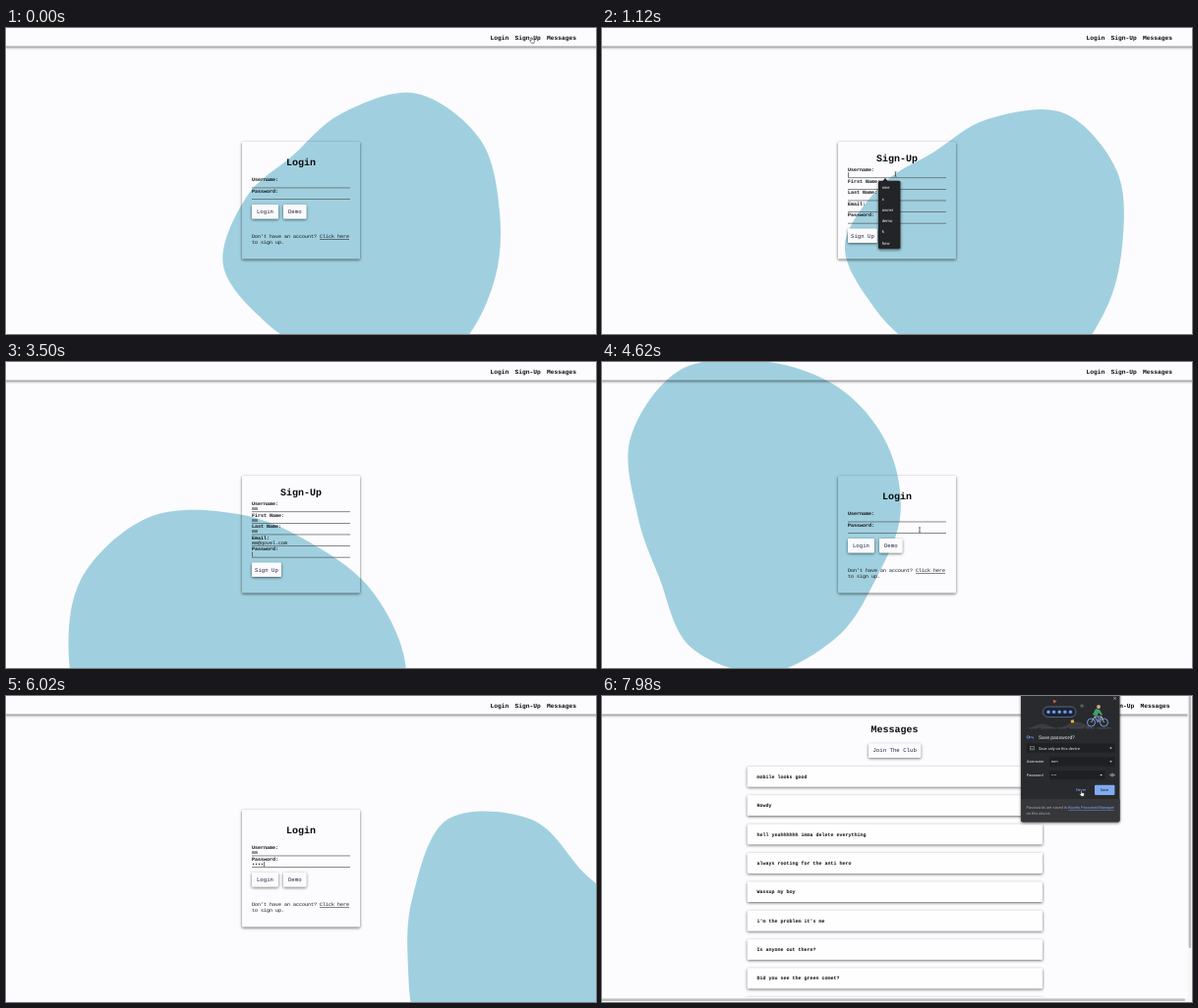
An HTML page that plays this animation: 600 px wide and 312 px high, repeating every 8 s.

```html
<!DOCTYPE html>
<html lang="en">
<head>
<meta charset="utf-8">
<title>Login demo</title>
<style>
  html, body { margin: 0; width: 100%; height: 100%; overflow: hidden; background: #fcfbfd; }
  svg { display: block; width: 100vw; height: 100vh; }
  text { font-family: "Liberation Mono", monospace; text-rendering: geometricPrecision; white-space: pre; }
  .ui text { font-family: Roboto, Arial, sans-serif; }
</style>
</head>
<body>
<svg id="stage" viewBox="0 0 600 312">
  <defs>
    <filter id="shade" filterUnits="userSpaceOnUse" x="-20" y="-20" width="640" height="360">
      <feGaussianBlur in="SourceAlpha" stdDeviation="1.7"/>
      <feOffset dy="1.2"/>
      <feComponentTransfer><feFuncA type="linear" slope=".6"/></feComponentTransfer>
      <feComposite in2="SourceAlpha" operator="out"/>
    </filter>
  </defs>
</svg>
<script>
const LOOP = 8000;
const SIGNUP = 140, LOGIN = 4425, MESSAGES = 6930, DIALOG = 7200;
const INK = '#0c0c0e';
const stage = document.getElementById('stage');

function el(tag, attrs, parent = stage, content) {
  const node = document.createElementNS('http://www.w3.org/2000/svg', tag);
  for (const k in attrs) node.setAttribute(k, attrs[k]);
  if (content !== undefined) node.textContent = content;
  return parent.appendChild(node);
}
const group = (parent, cls = '') => el('g', { class: cls }, parent);
const rect = (p, x, y, width, height, fill, rx = 0) => el('rect', { x, y, width, height, fill, rx }, p);
const text = (p, x, y, size, str, more = {}) => el('text', { x, y, 'font-size': size, fill: INK, ...more }, p, str);
const bold = (p, x, y, size, str) => text(p, x, y, size, str, { 'font-weight': 700 });
const path = (p, d, more) => el('path', { d, ...more }, p);
const dot = (p, cx, cy, r, more) => el('circle', { cx, cy, r, ...more }, p);
const show = (node, on) => node.setAttribute('display', on ? 'inline' : 'none');

// Shadow falls only outside the box, so the blob stays clean inside it.
function shadow(p, x, y, w, h, rx = 1) {
  rect(p, x, y, w, h, '#000', rx).setAttribute('filter', 'url(#shade)');
}
function button(p, x, y, w, h, label, size = 5.7) {
  shadow(p, x, y, w, h);
  rect(p, x, y, w, h, '#fbfbfe', 1);
  text(p, x + w / 2, y + h / 2 + 1.8, size, label, { 'text-anchor': 'middle', fill: '#25253f' });
}

/* ---------- blob ---------- */
const blob = path(stage, '', { fill: '#a0d0df' });

const EGG = [137, 130, 145, 162, 156, 126, 130, 158, 172, 157, 150, 143];
const PEAR = [145, 128, 131, 145, 124, 110, 129, 156, 152, 137, 137, 146];
const BEAN = [134, 126, 140, 172, 149, 108, 112, 130, 140, 145, 150, 150];
const BUD = [134, 127, 142, 170, 137, 112, 118, 132, 145, 150, 155, 150];
const DOME = [165, 171, 185, 181, 160, 150, 159, 171, 172, 170, 170, 165];
// s: eased progress, x/y: centre, a: turn in degrees, r: radii every 30 degrees
const poses = [
  { s: 0, x: 157, y: 153, a: -4, r: EGG },
  { s: .5, x: 392, y: 222, a: 90, r: PEAR },
  { s: .93, x: 535, y: 275, a: 150, r: BEAN },
  { s: 1, x: 556, y: 281, a: 157, r: BEAN },
  { s: 1.046, x: 530, y: 282, a: 150, r: BUD },
  { s: 1.5, x: 236, y: 315, a: 150, r: DOME },
  { s: 2, x: -90, y: 325, a: 150, r: DOME.map(v => v * 1.15) }
];

const clamp = (v, a = 0, b = 1) => Math.min(b, Math.max(a, v));
const mix = (a, b, k) => a + (b - a) * k;

// cubic-bezier(.42, 0, .58, 1)
function easeInOut(p) {
  if (p <= 0 || p >= 1) return clamp(p);
  let lo = 0, hi = 1;
  for (let i = 0; i < 22; i++) {
    const m = (lo + hi) / 2, n = 1 - m;
    if (1.26 * m * n * n + 1.74 * m * m * n + m * m * m < p) lo = m; else hi = m;
  }
  return lo * lo * (3 - 2 * lo);
}

function outline(pts) {
  const n = pts.length, at = i => pts[(i + n) % n], f = v => v.toFixed(2);
  let d = `M${f(pts[0][0])} ${f(pts[0][1])}`;
  for (let i = 0; i < n; i++) {
    const [a, b, c, e] = [at(i - 1), at(i), at(i + 1), at(i + 2)];
    d += 'C' + [b[0] + (c[0] - a[0]) / 6, b[1] + (c[1] - a[1]) / 6,
      c[0] - (e[0] - b[0]) / 6, c[1] - (e[1] - b[1]) / 6, c[0], c[1]].map(f).join(' ');
  }
  return d + 'Z';
}

// Each page change restarts the blob.
function drawBlob(t) {
  const u = t < SIGNUP ? t + 1055 : t < LOGIN ? t : t - 4285;
  const s = easeInOut((u - 140) / 1960) + easeInOut((u - 2100) / 2800);
  let i = 0;
  while (i < poses.length - 2 && poses[i + 1].s < s) i++;
  const p = poses[i], q = poses[i + 1], k = (s - p.s) / (q.s - p.s);
  const x = mix(p.x, q.x, k), y = mix(p.y, q.y, k), turn = mix(p.a, q.a, k);
  blob.setAttribute('d', outline(p.r.map((r, j) => {
    const a = (turn + 30 * j) * Math.PI / 180, len = mix(r, q.r[j], k);
    return [x + len * Math.cos(a), y + len * Math.sin(a)];
  })));
}

/* ---------- header ---------- */
const header = group(stage);
shadow(header, -10, -10, 620, 28.6, 0);
const nav = group(header);
bold(nav, 492.4, 11.5, 6.25, 'Login');
bold(nav, 517.4, 11.5, 6.25, 'Sign-Up');
bold(nav, 549.9, 11.5, 6.25, 'Messages');

/* ---------- forms ---------- */
function form(title, titleY, firstY, rows) {
  const g = group(stage);
  shadow(g, 240, 116, 120, 119.5);
  text(g, 300, titleY, 10, title, { 'text-anchor': 'middle', 'font-weight': 700 });
  const fields = rows.map(([label, value, focus, start, step], i) => {
    const y = firstY + i * 11.6;
    bold(g, 250, y, 5, label + ':');
    rect(g, 250, y + 6.4, 100, .7, '#55585c');
    return { value, focus, start, step, y, node: text(g, 250, y + 5.2, 5, '') };
  });
  const caret = rect(g, 0, 0, .6, 5, '#222');
  return { g, fields, caret };
}
function typeForm({ fields, caret }, t) {
  let active = null;
  for (const f of fields) {
    f.count = clamp(Math.floor((t - f.start) / f.step) + 1, 0, f.value.length);
    f.node.textContent = f.value.slice(0, f.count);
    if (t >= f.focus) active = f;
  }
  show(caret, active);
  if (active) {
    caret.setAttribute('x', 250.2 + active.count * 3);
    caret.setAttribute('y', active.y + 1.2);
  }
}

const login = form('Login', 139.6, 156.2, [
  ['Username', 'mm', 4900, 5050, 150],
  ['Password', '••••', 5400, 5500, 120]
]);
button(login.g, 250, 180, 27, 14.5, 'Login');
button(login.g, 282, 180, 23.5, 14.5, 'Demo');
text(login.g, 250, 214, 5, "Don't have an account? ");
text(login.g, 319, 214, 5, 'Click here', { 'text-decoration': 'underline' });
text(login.g, 250, 219.6, 5, 'to sign up.');

const signup = form('Sign-Up', 136.4, 146, [
  ['Username', 'mm', 1000, 1400, 120],
  ['First Name', 'mm', 1650, 1750, 120],
  ['Last Name', 'mm', 1950, 2050, 120],
  ['Email', 'mm@qovel.com', 2220, 2300, 90],
  ['Password', '••••', 3400, 3600, 110]
]);
button(signup.g, 250, 204.5, 30, 14.5, 'Sign Up');

const hints = group(stage, 'ui');
path(hints, 'M285 156.5l3-3.5 3 3.5z', { fill: '#232428' });
shadow(hints, 281, 155.7, 22.5, 69.6, 1.5);
rect(hints, 281, 155.7, 22.5, 69.6, '#232428', 1.5);
['nine', 'x', 'owner', 'demo', 'k', 'how'].forEach((s, i) =>
  text(hints, 284.7, 164.3 + i * 11.25, 4.2, s, { fill: '#f1f1f3' }));

/* ---------- messages ---------- */
const board = group(stage);
text(board, 297.5, 37.4, 10, 'Messages', { 'text-anchor': 'middle', 'font-weight': 700 });
button(board, 271, 48.5, 53.3, 14.3, 'Join The Club');
['mobile looks good', 'Howdy', 'hell yeahhhhhh imma delete everything',
  'always rooting for the anti hero', 'Wassup my boy', "i'm the problem it's me",
  'Is anyone out there?', 'Did you see the green comet?', ''].forEach((s, i) => {
  const y = 72 + i * 29.37;
  shadow(board, 147.8, y, 300.2, 20.6);
  rect(board, 147.8, y, 300.2, 20.6, '#fefefe', 1);
  bold(board, 157.5, y + 11.9, 5, s);
});
rect(board, 595.5, 0, 4.5, 312, '#f7f7f8');
rect(board, 0, 307.8, 600, 4.2, '#f7f7f8');
rect(board, 596.6, 0, 2.5, 257, '#bdbdbf', 1.2);
rect(board, 0, 308.6, 593, 2.5, '#bdbdbf', 1.2);

/* ---------- password bubble ---------- */
const dialog = group(stage, 'ui');
const PALE = '#e6e7ea', BLUE = '#7fabf2';
const note = (x, y, size, s, fill = PALE) => text(dialog, x, y, size, s, { fill });
const chevron = (x, y) => path(dialog, `M${x} ${y}h2.6l-1.3 1.5z`, { fill: PALE });
shadow(dialog, 426, -6, 100.6, 134.4, 2);
rect(dialog, 426, -6, 100.6, 134.4, '#292a2d', 2);
path(dialog, 'M426 105h100.6v21.4a2 2 0 0 1-2 2h-96.6a2 2 0 0 1-2-2z', { fill: '#36373b' });
path(dialog, 'M520.2 1l2.6 2.6m0-2.6l-2.6 2.6', { stroke: PALE, 'stroke-width': .5 });

path(dialog, 'M437 32.5q9-7 18-2t18-1 20 0 24 3z', { fill: '#3b3d42' });
path(dialog, 'M434 32.8h84', { stroke: '#606368', 'stroke-width': .5, 'stroke-dasharray': '9 3 15 2' });
el('rect', { x: 448.5, y: 11, width: 33.5, height: 10.5, rx: 5.2, fill: '#1d2430', stroke: '#65799a', 'stroke-width': .8 }, dialog);
for (let i = 0; i < 5; i++) dot(dialog, 454 + i * 5.6, 16.3, 1.7, { fill: '#6f9df0' });
path(dialog, 'M458.5 4l4 1-3 2.6z', { fill: '#e26055' });
path(dialog, 'M488 8l2.3 2-2.3 2-2-2z', { fill: '#5c6067' });
path(dialog, 'M476.5 25l3-1 .8 3-3 .6z', { fill: '#f0b83f' });
for (const x of [497.5, 510.5]) dot(dialog, x, 27, 4, { fill: 'none', stroke: '#79a7f2', 'stroke-width': .9 });
path(dialog, 'M497.5 27l3.5-6h7l2.5 6M501 21l3.5 6 3.5-6', { fill: 'none', stroke: '#d9dce2', 'stroke-width': .7 });
path(dialog, 'M499 19l3-6 4 1 3 5-1 1-3-3-2 4z', { fill: '#3fa463' });
path(dialog, 'M501 19l4 3-1 5', { fill: 'none', stroke: '#4f78c4', 'stroke-width': 1.4 });
dot(dialog, 505, 11, 1.9, { fill: '#d9a98b' });

dot(dialog, 433.4, 42, 1.3, { fill: 'none', stroke: '#6c9bea', 'stroke-width': .8 });
path(dialog, 'M434.7 42h3.8v1.4', { fill: 'none', stroke: '#6c9bea', 'stroke-width': .8 });
note(444, 43.7, 5.1, 'Save password?');
for (const [x, y, w, h] of [[431.8, 48.3, 89.8, 9.5], [455, 62.3, 66.6, 9.2], [455, 76, 56.5, 9.2]])
  rect(dialog, x, y, w, h, '#1f2023', 1);
el('rect', { x: 435.6, y: 51.3, width: 3.8, height: 2.6, fill: 'none', stroke: '#a8abb0', 'stroke-width': .5 }, dialog);
path(dialog, 'M434.8 54.8h5.4', { stroke: '#a8abb0', 'stroke-width': .5 });
note(444, 54.5, 3.95, 'Save only on this device');
note(431.8, 68.3, 3.8, 'Username');
note(456.8, 68.3, 3.8, 'mm');
note(431.8, 82, 3.8, 'Password');
note(456.8, 82.2, 4.2, '••••');
chevron(516.2, 52.4);
chevron(516.2, 66.3);
chevron(506.3, 80);
path(dialog, 'M516.4 80.6q2.6-3 5.2 0-2.6 3-5.2 0z', { fill: 'none', stroke: PALE, 'stroke-width': .5 });
dot(dialog, 519, 80.6, .7, { fill: PALE });
note(482, 97, 3.9, 'Never', BLUE);
rect(dialog, 501, 90.8, 20.4, 10.2, BLUE, 1);
note(506.7, 97.2, 3.9, 'Save', '#1c2027');
const foot = note(431.5, 115.3, 3.95, 'Passwords are saved to ', '#a3a6ab');
el('tspan', { fill: BLUE, 'text-decoration': 'underline' }, foot, 'Kovelo Password Manager');
note(431.5, 121.4, 3.95, 'on this device.', '#a3a6ab');

/* ---------- pointer ---------- */
const cursors = { beam: group(stage), hand: group(stage), arrow: group(stage) };
path(cursors.beam, 'M-.9-2.4q.9 0 .9.6 0-.6.9-.6M0-2v4M-.9 2.4q.9 0 .9-.6 0 .6.9.6',
  { fill: 'none', stroke: '#222', 'stroke-width': .6 });
path(cursors.hand, 'M-1-2.2q.7-.6 1 .2v1.6l2 .5q.7.3.5 1.2l-.5 2h-2.6l-1.8-2.4q0-.8.9-.4l.5.4z',
  { fill: '#fff', stroke: '#111', 'stroke-width': .5 });
path(cursors.arrow, 'M0 0v4.6l1.1-1 .8 1.8.8-.4-.8-1.7h1.5z', { fill: '#111', stroke: '#fff', 'stroke-width': .4 });

const trail = [
  [0, 535, 12, 'hand'], [250, 535, 12, 'arrow'], [900, 298.5, 149, 'beam'], [1400, 298.5, 149, ''],
  [3950, 270, 190, 'arrow'], [4250, 265, 212, 'hand'], [LOGIN, 265, 212, 'beam'], [4620, 323, 171, 'beam'],
  [4900, 300, 160, 'beam'], [5050, 300, 160, ''], [6150, 300, 171, 'arrow'], [6550, 263, 188, 'hand'],
  [MESSAGES, 263, 188, 'arrow'], [7560, 285, 200, 'arrow'], [7900, 488, 99, 'hand'], [LOOP, 488, 99, '']
];
function drawPointer(t) {
  let i = 0;
  while (i < trail.length - 2 && trail[i + 1][0] <= t) i++;
  const [t0, x0, y0, shape] = trail[i], [t1, x1, y1] = trail[i + 1];
  const k = easeInOut((t - t0) / (t1 - t0));
  for (const name in cursors) show(cursors[name], name === shape);
  if (shape) cursors[shape].setAttribute('transform', `translate(${mix(x0, x1, k)} ${mix(y0, y1, k)})`);
}

function render(t) {
  const onBoard = t >= MESSAGES, onSignup = t >= SIGNUP && t < LOGIN;
  show(blob, !onBoard);
  show(login.g, !onBoard && !onSignup);
  show(signup.g, onSignup);
  show(hints, t >= 1000 && t < 1400);
  show(board, onBoard);
  show(dialog, t >= DIALOG);
  nav.setAttribute('transform', `translate(${onBoard ? -2.3 : 0} 0)`);
  if (!onBoard) drawBlob(t);
  typeForm(onSignup ? signup : login, t);
  drawPointer(t);
}

let begin = null;
function tick(now) {
  if (begin === null) begin = now;
  render((now - begin) % LOOP);
  requestAnimationFrame(tick);
}
render(0);
requestAnimationFrame(tick);
</script>
</body>
</html>
```
